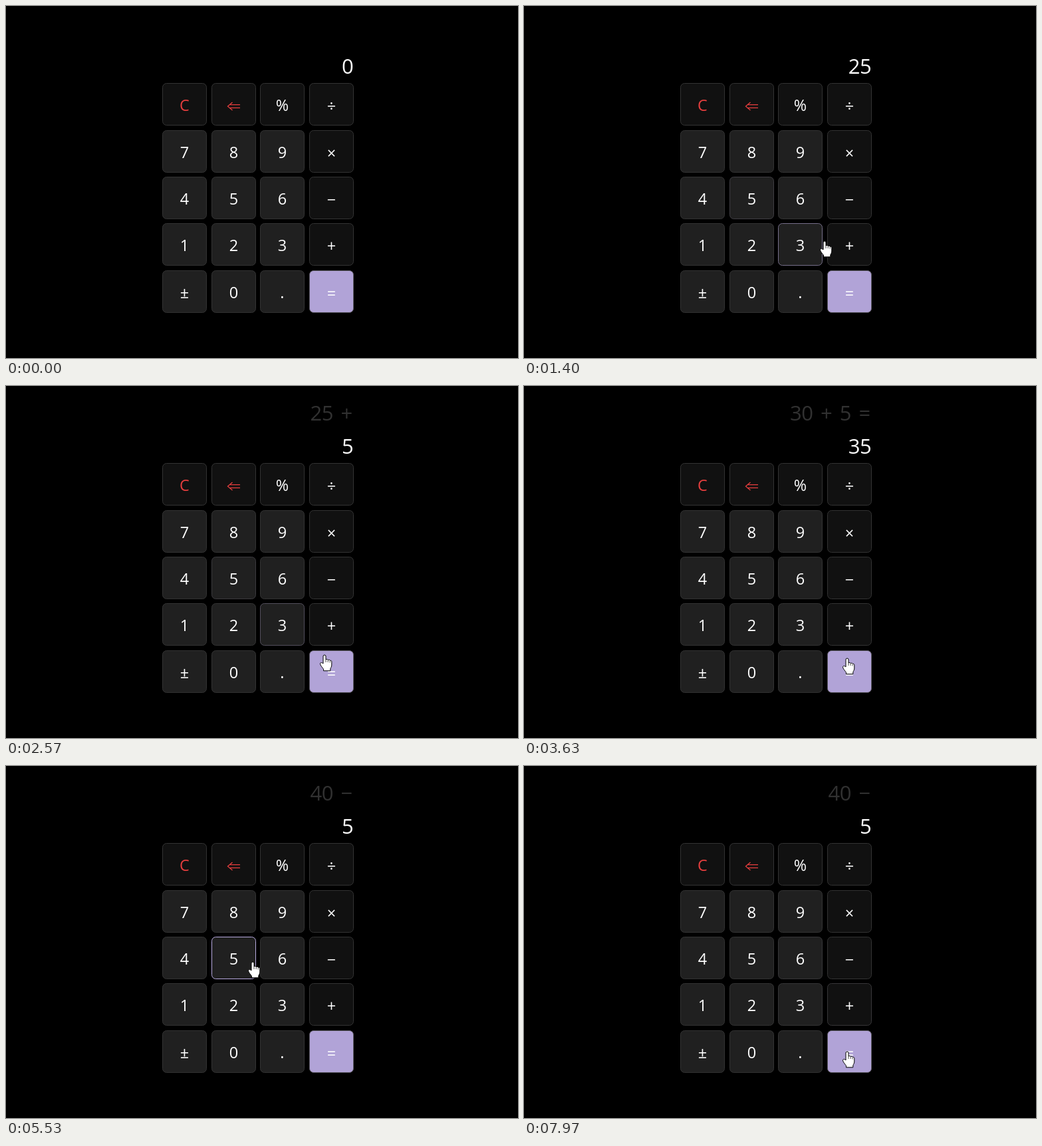
Animation, 770 px wide and 530 px high, one loop 8000 ms. Source, as an HTML page:

```html
<!DOCTYPE html>
<html lang="en">
<head>
<meta charset="utf-8">
<title>Calculator</title>
<style>
  html, body { margin: 0; width: 100%; height: 100%; overflow: hidden; background: #000; }
  svg { display: block; width: 770px; height: 530px; }
  text { font-family: "Open Sans", "Noto Sans", sans-serif; font-weight: 500; fill: #fff; white-space: pre; }
  .key { font-size: 23.5px; text-anchor: middle; }
  .line { font-size: 31px; letter-spacing: -.5px; word-spacing: 4px; text-anchor: end; }
</style>
</head>
<body>
<svg id="stage" viewBox="0 0 770 530"></svg>
<script>
const LOOP = 8000;
const stage = document.getElementById('stage');

function add(tag, attrs, parent = stage) {
  const el = document.createElementNS('http://www.w3.org/2000/svg', tag);
  for (const name in attrs) el.setAttribute(name, attrs[name]);
  parent.append(el);
  return el;
}

// Keypad
const RED = '#e53e3e', GREY = [51, 51, 51], PURPLE = [184, 170, 224];
const KEY_W = 67, KEY_H = 64;
const keys = [...'C⇐%÷789×456−123+±0.='].map((label, i) => {
  const col = i % 4, row = Math.floor(i / 4);
  const x = Math.round(235.2 + col * 73.6), y = Math.round(116.15 + row * 70.4);
  const fill = label === '=' ? '#b1a3d7' : row === 0 || col === 3 ? '#111' : '#202020';
  const box = add('rect', {
    x: x + .5, y: y + .5, width: KEY_W - 1, height: KEY_H - 1, rx: 6, fill, stroke: '#5a5860'
  });
  if (label === '⇐') {
    add('path', {
      d: 'M352 148.6H337M352 153.4H337M340.5 145L333.5 151L340.5 157',
      fill: 'none', stroke: RED, 'stroke-width': 1.3
    });
  } else {
    const text = add('text', { class: 'key', x: x + 33.5, y: y + (col === 3 ? 43.3 : 42.3) });
    text.textContent = label;
    if (label === 'C') text.style.fill = RED;
  }
  return { label, x, y, box };
});
const hoverKeys = keys.filter(k => k.label !== '=');

// Calculator: pressed keys, from which both lines of the readout follow
const presses = [
  [500, '2'], [930, '5'], [1670, '+'], [2270, '5'], [2800, '='], [3270, '='],
  [3700, '='], [4370, '−'], [5530, '5'], [6130, '6'], [7700, '⇐']
];

function press({ shown, upper, left, op, right, fresh }, key) {
  if (key >= '0' && key <= '9') {
    shown = fresh ? key : shown + key;
    fresh = false;
  } else if (key === '⇐') {
    shown = shown.slice(0, -1) || '0';
  } else if (key === '=') {
    if (upper.endsWith('=')) left = shown;   // repeat the last operation
    else right = shown;
    upper = `${left} ${op} ${right} =`;
    shown = String(op === '+' ? +left + +right : left - right);
    fresh = true;
  } else {
    left = shown;
    op = key;
    upper = `${left} ${op}`;
    fresh = true;
  }
  return { shown, upper, left, op, right, fresh };
}

const history = add('text', { class: 'line', x: 520.8, y: 52, style: 'fill:#313131' });
const display = add('text', { class: 'line', x: 522.3, y: 102 });

// Pointer
const pointer = add('g', { stroke: '#000' });
const arrow = add('path', { d: 'M0 0V17l4-4 3 6.5 2.5-1-3-6.3h5.5z', fill: '#fff' }, pointer);
const hand = add('g', {}, pointer);
add('path', {
  d: 'M-2 2a2 2 0 0 1 4 0v5c.8-.9 3-.6 3.4.6c1-.8 2.6-.3 3 .8c1-.5 2.4 0 2.4 1.8V15' +
     'c0 3-1.5 4-2 6v2.8H-1.5v-2.5C-3 19-6.5 15.5-6.5 13.2c0-2 2.4-2.3 4.5-.2z',
  fill: '#fff'
}, hand);
add('path', { d: 'M2 7v4M5.2 8v3M8.2 9v2.5', fill: 'none', 'stroke-width': .7 }, hand);

// Eased moves between rests: begin, end, x, y
const moves = [
  [30, 480, 345, 362], [700, 900, 345, 298], [1193, 1500, 487, 372], [1790, 2100, 345, 298],
  [2370, 2600, 486, 410], [3900, 4130, 485, 300], [4600, 4950, 371, 295],
  [5730, 5950, 416, 282], [6400, 6700, 418, 163], [6780, 6980, 345, 156], [7700, 7970, 486, 430]
];

function pointerAt(t) {
  let x = 257, y = 6;
  for (const [begin, end, toX, toY] of moves) {
    if (t < begin) break;
    const u = Math.min(1, (t - begin) / (end - begin)), k = u * u * (3 - 2 * u);
    x += (toX - x) * k;
    y += (toY - y) * k;
  }
  return [x, y];
}

// Border highlight: rises and fades smoothly behind the pointer
function hoverLevels(t) {
  const levels = hoverKeys.map(() => 0), step = 10, rate = 1 - Math.exp(-step / 70);
  for (let s = Math.max(0, t - 600); s < t; s += step) {
    const [px, py] = pointerAt(s);
    hoverKeys.forEach(({ x, y }, i) => {
      const inside = px >= x && px < x + KEY_W && py >= y && py < y + KEY_H;
      levels[i] += (inside - levels[i]) * rate;
    });
  }
  return levels.map(v => v ** 1.5);
}

function render(t) {
  const state = presses.filter(([at]) => at <= t)
    .reduce((s, [, key]) => press(s, key), { shown: '0', upper: '', fresh: true });
  history.textContent = state.upper;
  display.textContent = state.shown;

  hoverLevels(t).forEach((v, i) => {
    const rgb = GREY.map((c, j) => Math.round(c + (PURPLE[j] - c) * v));
    hoverKeys[i].box.setAttribute('stroke', `rgb(${rgb})`);
  });

  const [x, y] = pointerAt(t).map(Math.round);
  pointer.setAttribute('transform', `translate(${x} ${y})`);
  pointer.style.display = t < moves[0][0] ? 'none' : '';
  hand.style.display = y >= 116 ? '' : 'none';
  arrow.style.display = y >= 116 ? 'none' : '';
}

let start;
function tick(now) {
  start ??= now;
  render((now - start) % LOOP);
  requestAnimationFrame(tick);
}
render(0);
requestAnimationFrame(tick);
</script>
</body>
</html>
```
